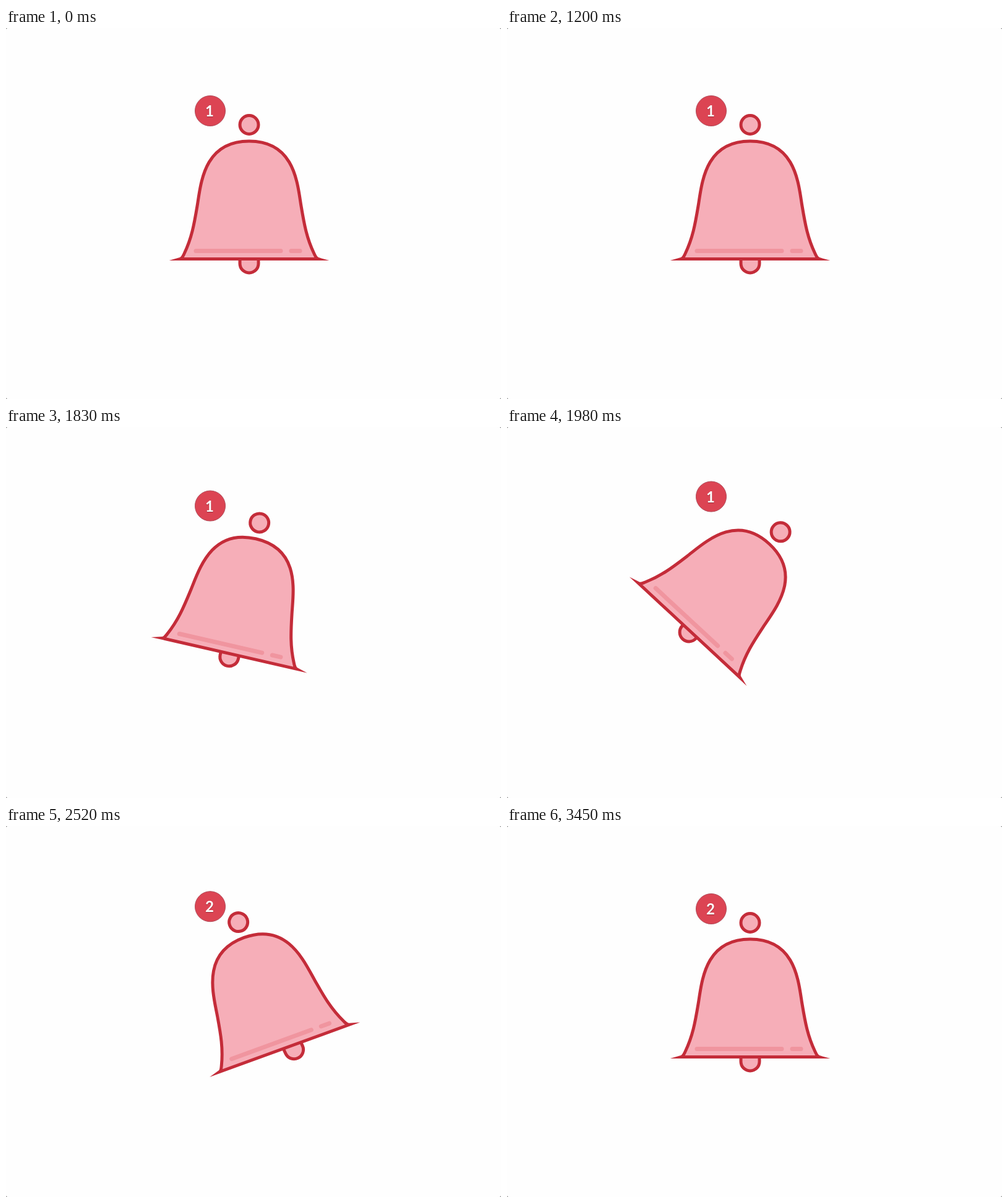
Recreate the animation shown at these times as an HTML page. Size 800 px wide and 600 px high, loop 3.63 s.

```html
<!DOCTYPE html>
<html lang="en">
<head>
<meta charset="utf-8">
<title>Notification bell</title>
<style>
  html, body { margin: 0; width: 100%; height: 100%; overflow: hidden; background: #777; }
  svg { display: block; width: 100vw; height: 100vh; background: #fefefe; border-radius: 3px; }
  .line { fill: #f6aeb8; stroke: #c42c39; stroke-width: 5; stroke-miterlimit: 8; }
  .bar { stroke: #f0959f; stroke-width: 7; stroke-linecap: round; }
  .dot { fill: #dc4453; stroke: #b04a58; stroke-width: 1; }
  text { font: 700 24px Lato, sans-serif; fill: #fff; text-anchor: middle; text-shadow: 0 1px 1px rgba(70, 20, 30, .45); }
</style>
</head>
<body>
<svg viewBox="0 0 800 600">
  <g id="bell">
    <g id="clapper"><rect class="line" x="-15" y="64" width="30" height="75" rx="15"/></g>
    <circle class="line" cy="-100.5" r="15"/>
    <path class="line" transform="translate(-393 -257)" d="M281.5 373.5
      C285 372.5 286 369 288 365 C300 340 304 318 309 288 C315 252 319 183 393 183
      C467 183 471 252 477 288 C482 318 486 340 498 365 C500 369 501 372.5 504.5 373.5 Z"/>
    <path class="bar" d="M-86 103.5H51M68 103.5H82"/>
  </g>
  <g id="badge">
    <circle class="dot" r="24.5"/>
    <text id="count" x="-1" y="9">1</text>
  </g>
</svg>
<script>
const LOOP = 3630, STEP = 30;
const $ = id => document.getElementById(id);
const bell = $('bell'), clapper = $('clapper'), badge = $('badge'), count = $('count');

const windUp = u => u ** 3.2;
const inOut = u => u * u * (3 - 2 * u);
const out = u => 1 - (1 - u) ** 3;

// Rows: time, values..., easing used to reach the row
const bellKeys = [            // dx, dy, degrees
  [1500, 0, 0, 0],
  [2033, -27, -19, 60, windUp],
  [2310, -27, -19, 60, inOut],
  [2520, 17, -7, -20, inOut],
  [2600, -26, -7, 20, inOut],
  [2670, 4, 0, -4, inOut],
  [2730, 0.4, 0, -0.25, out],
  [3090, 0, 0, 0, out]
];
const clapperKeys = [         // dx, dy, degrees, inside the bell
  [1700, 0, 0, 0],
  [1980, 2, -5, 0, inOut],
  [2210, -60, 14, 20, inOut],
  [2310, -52, 8, 17, inOut],
  [2520, 14, 0, -5, inOut],
  [2600, -10, 0, 4, inOut],
  [2730, 0, 0, 0, out]
];
const badgeKeys = [           // dy
  [1500, 0],
  [2033, -30, windUp],
  [2310, -30, inOut],
  [2580, 0, inOut]
];

function sample(keys, t) {
  const values = row => row.slice(1).filter(v => typeof v === 'number');
  const i = keys.findIndex(row => row[0] > t);
  if (i === 0) return values(keys[0]);
  if (i < 0) return values(keys[keys.length - 1]);
  const a = keys[i - 1], b = keys[i];
  const p = b[b.length - 1]((t - a[0]) / (b[0] - a[0]));
  const to = values(b);
  return values(a).map((v, k) => v + (to[k] - v) * p);
}

function place(el, x, y, turn = 0, px = 0, py = 0) {
  el.setAttribute('transform', `translate(${x} ${y}) rotate(${turn} ${px} ${py})`);
}

function draw(time) {
  const t = Math.floor((time % LOOP) / STEP) * STEP;
  const [bx, by, turn] = sample(bellKeys, t);
  const [cx, cy, swing] = sample(clapperKeys, t);
  place(bell, 393 + bx, 257 + by, turn);
  place(clapper, cx, cy, swing, 0, 124);
  place(badge, 330, 134 + sample(badgeKeys, t)[0]);
  count.textContent = t < 2430 ? '1' : '2';
}

const start = performance.now();
function tick() {
  draw(performance.now() - start);
  requestAnimationFrame(tick);
}
tick();
</script>
</body>
</html>
```
